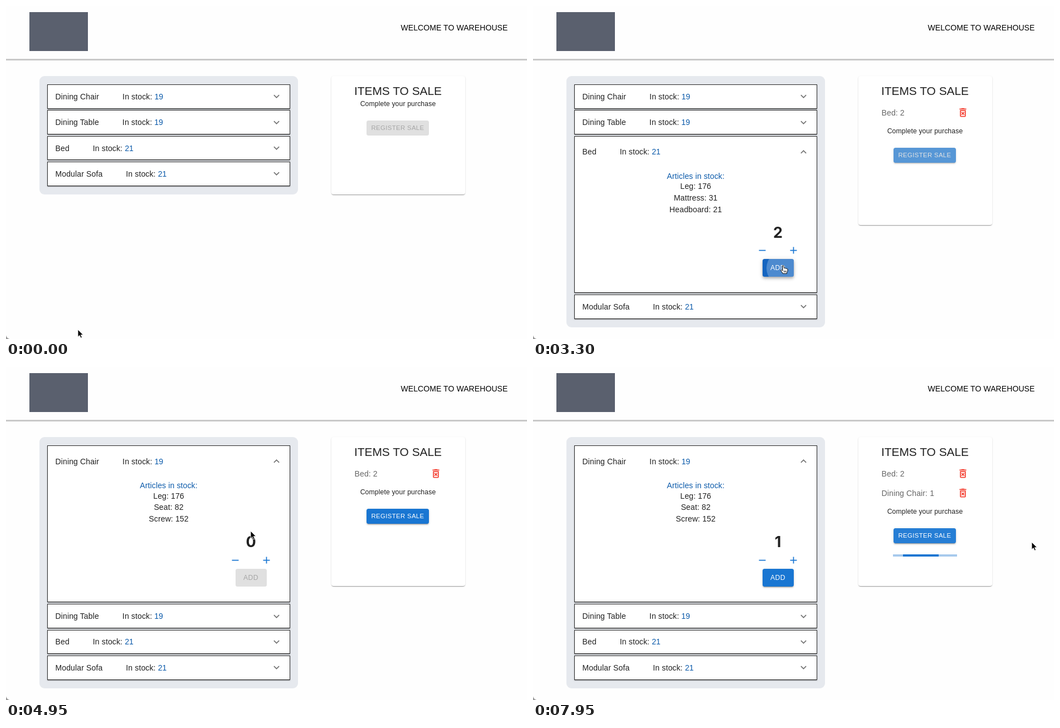
An HTML page for the animation above (8 s loop, 935 px wide and 599 px high).

```html
<!DOCTYPE html>
<html lang="en">
<head>
<meta charset="utf-8">
<title>Warehouse</title>
<style>
html, body { margin: 0; width: 100%; height: 100%; overflow: hidden; background: #fefefe; }
#stage { position: relative; width: 935px; height: 599px; overflow: hidden; color: #212121;
  font: 14px/20px "Liberation Sans", Arial, sans-serif; letter-spacing: .13px; white-space: nowrap; }
#stage div, #stage svg, #stage b, #stage i { position: absolute; }
.logo { left: 42px; top: 11px; width: 105px; height: 70px; background: #5a606e; }
.welcome { left: 708.5px; top: 29px; color: #000; letter-spacing: .08px; }
.line { top: 95px; width: 100%; height: 2.6px; background: #c9c9c9; }
.corner { left: 0; bottom: 0; width: 8px; height: 8px;
  background: radial-gradient(circle at 100% 0, transparent 7.6px, #999 8.4px); }
#stock { left: 60px; top: 125.5px; width: 464px; border-radius: 9px; background: #e6e9ee; }
#sale { left: 583.5px; top: 125.5px; width: 240px; border-radius: 4px; }
.row { left: 74px; width: 436px; box-sizing: border-box; border: 1px solid #2a2a2a; overflow: hidden; }
#sale, .row { background: #fff;
  box-shadow: 0 2px 1px -1px #0003, 0 1px 1px #00000024, 0 1px 3px #0000001f; }
.head { left: 13.5px; right: 0; top: 0; }
.head span { margin-left: 42px; }
.blue, .head em { color: #0b5aaa; font-style: normal; }
.body { left: 0; width: 434px; height: 225px; }
.mid { left: 0; width: 100%; text-align: center; }
#stage b { left: 334.5px; top: 104px; width: 60px; text-align: center;
  font: 700 27px/28px Inter, sans-serif; letter-spacing: 0; }
.btn { border-radius: 3.5px; text-align: center; overflow: hidden; }
.btn i { border-radius: 50%; background: currentColor; }
.add { left: 336.5px; top: 165.2px; width: 56px; height: 32px; font-size: 12.2px; line-height: 32px; letter-spacing: .35px; }
.plus { left: 365px; top: 133.7px; width: 55px; height: 31px; color: #1976d2; }
.sell { left: 63.5px; width: 112px; height: 27px; font-size: 11.3px; line-height: 27px; letter-spacing: .4px; }
.title { top: 15.5px; line-height: 24px; font-size: 20.9px; letter-spacing: 0; }
.sub { font-size: 12.2px; }
.item { left: 42px; width: 160px; color: #666; }
.item svg { left: 135px; top: -.5px; }
.bar { left: 62.5px; top: 211.5px; width: 115px; height: 3.6px; background: #a7caed; overflow: hidden; }
.bar div { top: 0; bottom: 0; background: #1976d2; }
</style>
</head>
<body>
<div id="stage">
  <div class="logo"></div>
  <div class="welcome">WELCOME TO WAREHOUSE</div>
  <div class="line"></div>
  <div id="stock"></div>
  <div id="rows"></div>
  <div id="sale">
    <div class="mid title">ITEMS TO SALE</div>
    <div class="mid sub">Complete your purchase</div>
    <div class="btn sell">REGISTER SALE<i></i></div>
    <div class="bar"><div></div></div>
  </div>
  <div class="corner"></div>
  <svg id="cursor" width="1" height="1" overflow="visible">
    <path id="arrow" d="M0 0V13.3L3.1 10.5 5.2 15.2 7.5 14.2 5.4 9.7H9.5Z" stroke="#fff" stroke-width=".9"/>
    <g id="hand" stroke="#000">
      <path fill="#fff" d="M-1.6 1C-1.6-.5 .9-.5 1 1L1.5 4.6C2.2 3.9 3.6 4.1 3.9 5.1 4.6 4.5 6 4.8 6.2 5.8 7.2 5.4 8.1 6 8.1 7.2 8.1 10 7.5 11 6.6 12.6V14.2H-.8C-1.2 12.8-2.6 11.2-4 9.2-4.6 8.2-3.4 7-2.2 8L-.8 9.2Z"/>
      <path stroke-width=".8" d="M1.6 9v3M3.4 9v3M5.2 9v3"/>
    </g>
  </svg>
</div>
<script>
const LOOP = 8000, STEP = 150;
const $ = (sel, root = document) => root.querySelector(sel);
const clamp = v => Math.max(0, Math.min(1, v));

function bezier(x1, y1, x2, y2) {
  const f = (a, b, u) => 3 * (1 - u) ** 2 * u * a + 3 * (1 - u) * u * u * b + u ** 3;
  return x => {
    if (x <= 0 || x >= 1) return clamp(x);
    let lo = 0, hi = 1;
    for (let i = 0; i < 24; i++) {
      const u = (lo + hi) / 2;
      if (f(x1, x2, u) < x) lo = u; else hi = u;
    }
    return f(y1, y2, hi);
  };
}
const ease = bezier(.4, 0, .2, 1);
const slide = bezier(.65, .815, .735, .395);
const ramp = (t, start, ms) => ease((t - start) / ms);
const mix = (a, b, k) => `rgb(${a.map((v, i) => v + (b[i] - v) * k)})`;
const since = (times, t) => times.filter(s => t >= s).length;

// open: [expand, collapse]; plus: clicks on the plus button
const rows = [
  { name: 'Dining Chair', stock: 19, parts: ['Leg: 176', 'Seat: 82', 'Screw: 152'], open: [4530, Infinity], plus: [5360] },
  { name: 'Dining Table', stock: 19 },
  { name: 'Bed', stock: 21, parts: ['Leg: 176', 'Mattress: 31', 'Headboard: 21'], open: [1250, 4067], plus: [2230, 2530] },
  { name: 'Modular Sofa', stock: 21 }
];
const items = [{ text: 'Bed: 2', at: 3190 }, { text: 'Dining Chair: 1', at: 6540 }];
const SOLD = 7515;
const path = [
  [0, 129, 582], [750, 490, 330], [900, 505, 290], [1050, 500, 262], [1350, 495, 262],
  [1650, 478, 370], [1950, 463, 443], [2550, 463, 443], [2850, 449, 467], [3300, 449, 467],
  [3900, 440, 262], [4050, 440, 262], [4200, 436, 206], [4350, 436, 172], [4500, 436, 172],
  [4950, 438.5, 295], [5250, 463, 350], [5400, 463, 350], [5850, 432, 388], [6000, 432, 388],
  [6300, 422, 386], [6600, 422, 386], [7050, 700, 303], [7500, 700, 303], [7950, 894.5, 315]
];

const icon = (d, color) => `<svg width="21" height="21" viewBox="0 0 24 24" fill="${color}"><path d="${d}"/></svg>`;
const chevron = icon('M16.59 8.59 12 13.17 7.41 8.59 6 10l6 6 6-6z', '#757575');
const trash = icon('M14.12 10.47 12 12.59l-2.13-2.12-1.41 1.41L10.59 14l-2.12 2.12 1.41 1.41L12 15.41l2.12 2.12 1.41-1.41L13.41 14l2.12-2.12zM15.5 4l-1-1h-5l-1 1H5v2h14V4zM6 19c0 1.1.9 2 2 2h8c1.1 0 2-.9 2-2V7H6v12zM8 9h8v10H8V9z', '#f44336');

function make(parent, cls, html) {
  const el = document.createElement('div');
  el.className = cls;
  el.innerHTML = html;
  parent.append(el);
  return el;
}

for (const r of rows) {
  r.el = make($('#rows'), 'row', '');
  r.head = make(r.el, 'head', `${r.name}<span>In stock: <em>${r.stock}</em></span>`);
  r.arrow = make(r.el, '', chevron);
  r.arrow.style.cssText = 'left:399.5px;width:21px;height:21px';
  if (!r.parts) continue;
  const lines = r.parts.map((p, i) => `<div class="mid" style="top:${24.2 + 20.9 * i}px">${p}</div>`).join('');
  r.body = make(r.el, 'body', `<div class="mid blue" style="top:5.8px">Articles in stock:</div>${lines}<b></b>
    <div class="btn plus"><i></i></div>
    <svg style="left:330px;top:143.2px" width="70" height="13" stroke="#1976d2" stroke-width="1.75"><path d="M.5 6.5h12M56.5 6.5h12M62.5 .5v12"/></svg>
    <div class="btn add">ADD<i></i></div>`);
  r.add = $('.add', r.body);
  r.more = $('.plus', r.body);
}
const sale = $('#sale'), sub = $('.sub'), sell = $('.sell'), bar = $('.bar');
items.forEach((it, i) => {
  it.el = make(sale, 'item', it.text + trash);
  it.el.style.top = 56.2 + 34.9 * i + 'px';
});

// [button, press time, local x, local y]
const chair = rows[0], bed = rows[2];
const presses = [
  [bed.more, 2180, 23, 19], [bed.more, 2480, 23, 19], [bed.add, 3050, 38, 16],
  [chair.more, 5310, 23, 22], [chair.add, 6400, 11, 24], [sell, 7360, 53, 14]
];

function paint(el, on, hover) {
  const shade = hover
    ? [['0 2px 4px -1px', .2], ['0 4px 5px', .14], ['0 1px 10px', .12]]
    : [['0 3px 1px -2px', .2], ['0 2px 2px', .14], ['0 1px 5px', .12]];
  el.style.background = mix([224, 224, 224], hover ? [21, 101, 192] : [25, 118, 210], on);
  el.style.color = mix([166, 166, 166], [255, 255, 255], on);
  el.style.boxShadow = shade.map(([s, a]) => `${s} rgba(0,0,0,${a * on})`).join();
}

function ripples(t) {
  for (const [el] of presses) $('i', el).style.opacity = 0;
  for (const [el, at, x, y] of presses) {
    const age = t - at;
    if (age < 0 || age > 690) continue;
    const w = el.offsetWidth, h = el.offsetHeight;
    const r = Math.hypot(Math.max(x, w - x) + 1, Math.max(y, h - y) + 1) * ease(age / 550);
    $('i', el).style.cssText = `left:${x - r}px;top:${y - r}px;width:${2 * r}px;height:${2 * r}px;` +
      `opacity:${.3 * (1 - clamp((age - 140) / 550))}`;
  }
}

function pointer(t) {
  const n = path.findIndex(p => p[0] > t);
  if (n < 0) return path.at(-1).slice(1);
  const [a, b] = [path[n - 1], path[n]], k = (t - a[0]) / (b[0] - a[0]);
  return [a[1] + (b[1] - a[1]) * k, a[2] + (b[2] - a[2]) * k];
}

function draw(t) {
  const [x, y] = pointer(t);
  const over = (l, top, w, h) => x >= l && x <= l + w && y >= top && y <= top + h;
  let hand = false, top = 141;

  for (const r of rows) {
    const [a, b] = r.open || [Infinity, Infinity];
    const turn = ramp(t, a, 150) - ramp(t, b, 150);
    const grow = ramp(t, a, 299) - ramp(t, b, 299);
    const headH = 41.5 + 13.9 * turn, height = headH + 2 + 225 * grow;
    r.el.style.top = top + 'px';
    r.el.style.height = height + 'px';
    r.head.style.top = headH / 2 - 10 + 'px';
    r.arrow.style.top = headH / 2 - 10.5 + 'px';
    r.arrow.style.transform = `rotate(${180 * turn}deg)`;
    hand ||= over(74, top, 436, headH + 2);
    if (r.body) {
      const y0 = top + 1 + headH, count = since(r.plus, t);
      r.body.style.top = headH + 'px';
      r.body.style.visibility = grow > 0 ? 'visible' : 'hidden';
      $('b', r.body).textContent = count;
      const onPlus = grow === 1 && over(440, y0 + 133.7, 55, 31);
      const onAdd = grow === 1 && count > 0 && over(411.5, y0 + 165.2, 56, 32);
      r.more.style.background = onPlus ? 'rgba(25,118,210,.04)' : 'none';
      paint(r.add, ramp(t, r.plus[0], 250), onAdd);
      hand ||= onPlus || onAdd;
    }
    top += height + 2.9;
  }

  const stockH = top - 2.9 + 15.3 - 125.5;
  $('#stock').style.height = stockH + 'px';
  sale.style.height = Math.min(stockH, 268.3) + 'px';

  const n = since(items.map(i => i.at), t), shift = n && 14 + 34.9 * n;
  for (const it of items) it.el.style.display = t >= it.at ? '' : 'none';
  sub.style.top = 40.7 + shift + 'px';
  sell.style.top = 80.3 + shift + 'px';
  const onSell = n > 0 && over(647, 205.8 + shift, 112, 27);
  paint(sell, ramp(t, items[0].at, 250), onSell);
  hand ||= onSell;

  const p = slide((t - SOLD) / 1260);
  bar.style.display = t >= SOLD ? '' : 'none';
  bar.firstChild.style.left = -35 + 135 * p + '%';
  bar.firstChild.style.right = 100 - 190 * p + '%';

  ripples(t);
  $('#cursor').style.left = x + 'px';
  $('#cursor').style.top = y + 'px';
  $('#arrow').style.display = hand ? 'none' : '';
  $('#hand').style.display = hand ? '' : 'none';
}

const start = performance.now();
function tick() {
  const t = (performance.now() - start) % LOOP;
  draw(Math.floor(t / STEP) * STEP);
  requestAnimationFrame(tick);
}
tick();
</script>
</body>
</html>
```
